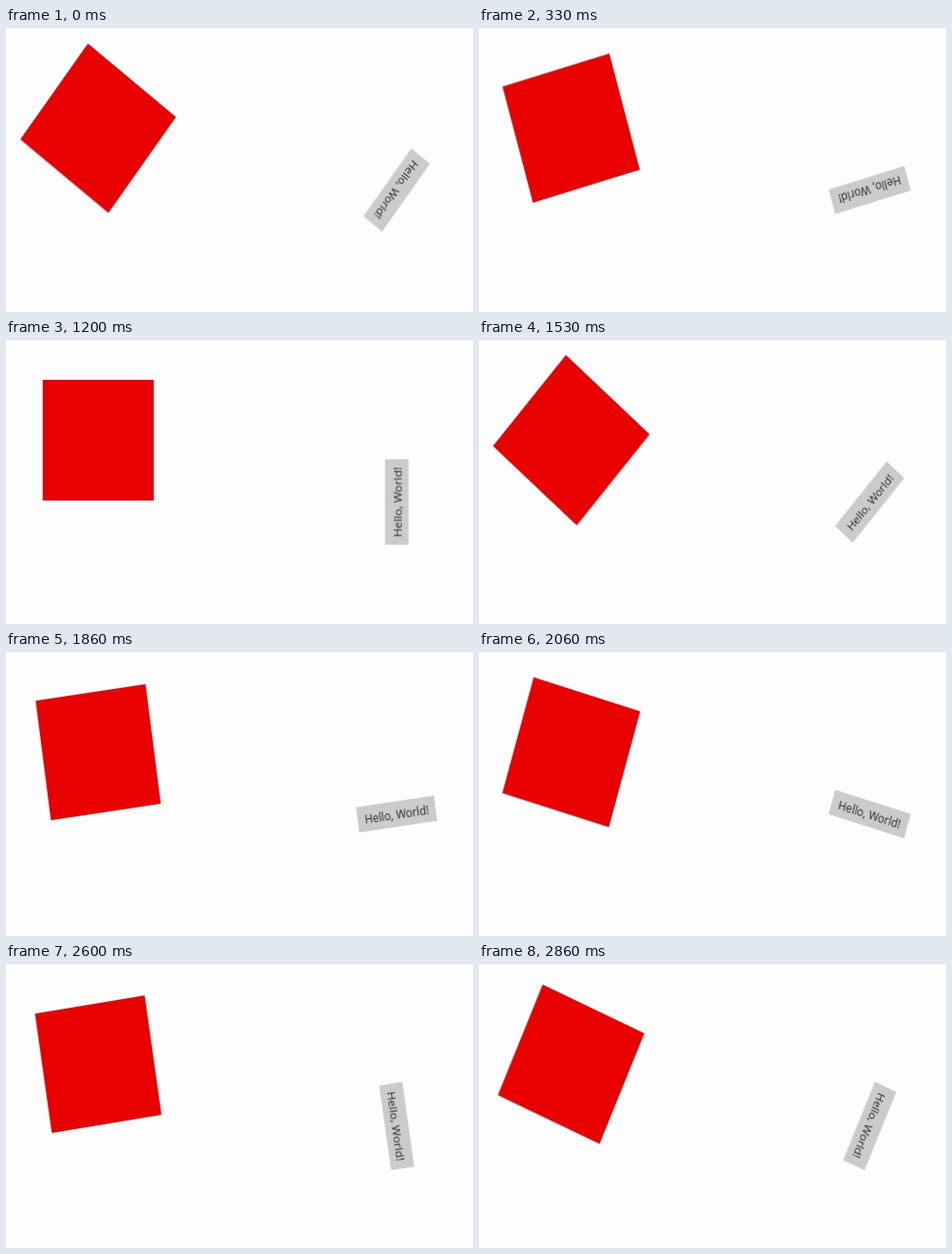
An HTML page without scripts for the animation above (2.92 s loop, 480 by 292 pixels).

```html
<!DOCTYPE html>
<html lang="en">
<head>
<meta charset="utf-8">
<title>Spinning square and button</title>
<style>
html, body { margin: 0; width: 100%; height: 100%; overflow: hidden; background: #fefdfe; }
svg { display: block; width: 480px; height: 292px; }
.spin { transform-origin: 0 0; animation: spin 2920ms infinite; }
.square { fill: #e90000; stroke: #8c0000; stroke-width: .6; }
.button { fill: #cbcacc; }
text { font: 12.1px "Open Sans", "Noto Sans", sans-serif; fill: #262628; text-anchor: middle; }

/* about 8 degrees per tick, 15 ticks per second */
@keyframes spin {
  0%      { transform: rotate(127.5deg); animation-timing-function: step-end; }
  2.055%  { transform: rotate(134.8deg); animation-timing-function: steps(4); }
  11.187% { transform: rotate(164.1deg); animation-timing-function: steps(6); }
  24.886% { transform: rotate(212.8deg); animation-timing-function: steps(7); }
  40.868% { transform: rotate(270deg);   animation-timing-function: steps(10); }
  63.699% { transform: rotate(352.1deg); animation-timing-function: steps(7); }
  79.68%  { transform: rotate(408.8deg); animation-timing-function: steps(8); }
  97.945%, 100% { transform: rotate(473.8deg); animation-timing-function: step-end; }
}
</style>
</head>
<body>
<svg viewBox="0 0 480 292">
  <rect width="480" height="1" fill="#f6f6f7"/>
  <!-- the view is squeezed sideways, so the parts shear as they turn -->
  <g transform="translate(94.8 103) scale(.919 1)">
    <g class="spin"><rect class="square" x="-61.8" y="-61.8" width="123.6" height="123.6"/></g>
  </g>
  <g transform="translate(401.6 166.6) scale(.919 1)">
    <g class="spin">
      <rect class="button" x="-44" y="-13.1" width="88" height="26.2"/>
      <text y="5.3">Hello, World!</text>
    </g>
  </g>
</svg>
</body>
</html>
```
